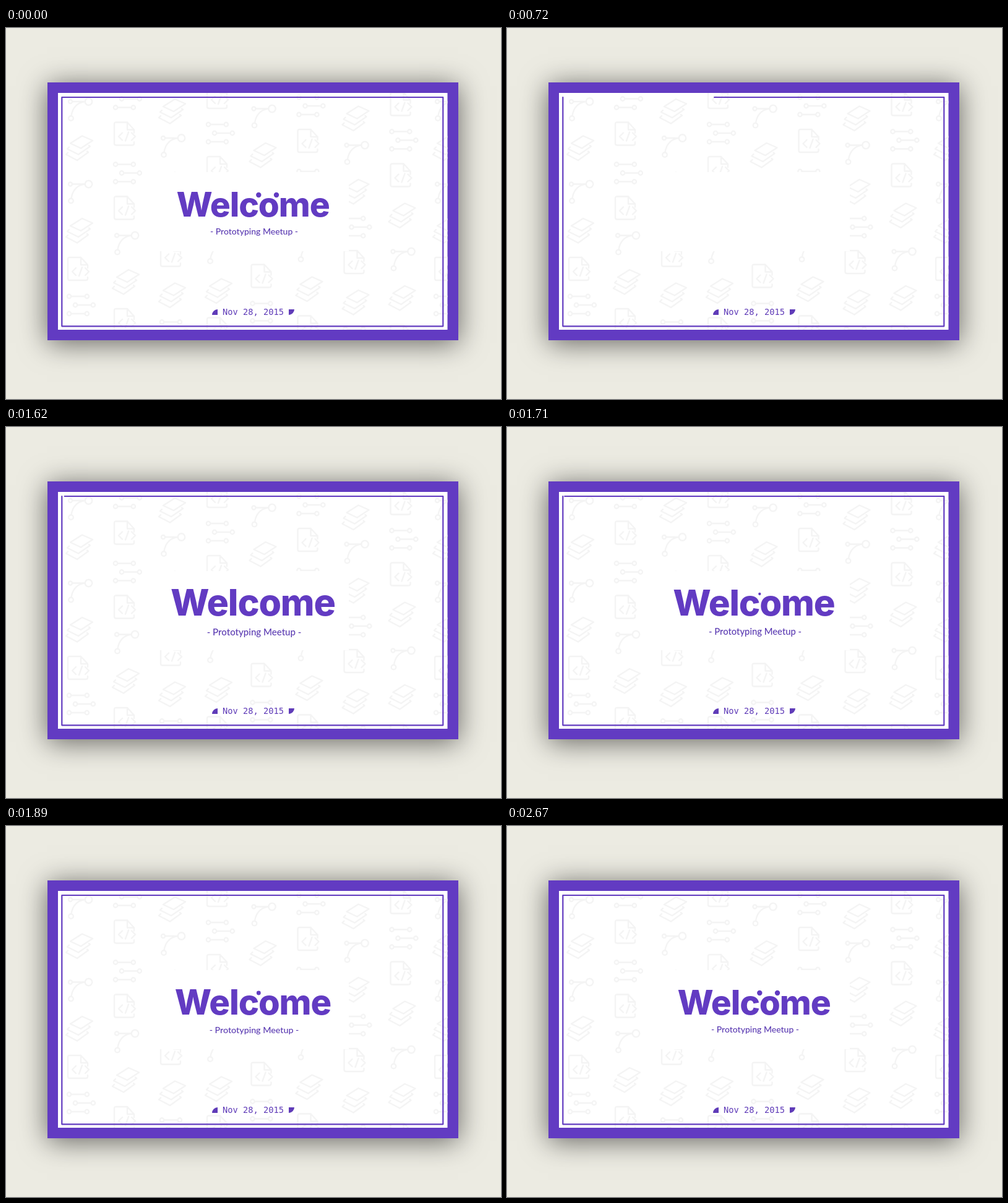
Recreate the animation shown at these times as an HTML page. Size 800 by 600 pixels, loop 3.33 s.

```html
<!DOCTYPE html>
<html lang="en">
<head>
<meta charset="utf-8">
<title>Welcome</title>
<style>
html, body { margin: 0; width: 100%; height: 100%; overflow: hidden; background: #ecebe2; }
.card { position: absolute; left: 67px; top: 87.7px; width: 663.5px; height: 417.5px; background: #623bc2;
  box-shadow: 0 5px 42px rgba(0, 0, 0, .58); }
svg { position: absolute; left: 0; top: 0; }
.icons { fill: none; stroke: #f4f4f4; stroke-width: 2.4; stroke-linecap: round; stroke-linejoin: round; }
.title { font: 800 55px Inter, sans-serif; letter-spacing: -1.1px; }
.sub { font: 500 14px Lato, sans-serif; }
.date { font: 13.7px "DejaVu Sans Mono", monospace; }
</style>
</head>
<body>
<div class="card"></div>
<svg width="800" height="600" viewBox="0 0 800 600">
  <defs>
    <clipPath id="paper"><rect x="84" y="105" width="629.5" height="383"/></clipPath>
    <g id="curve">
      <circle r="5.7"/><circle cx="-29.5" r="3"/><circle cx="-28.5" cy="27" r="3.8"/>
      <path d="M-26.5 0H-5.7M-28 23C-26 9-17 1-6 0"/>
    </g>
    <g id="row"><path d="M3.3 0H25.5"/><circle r="3.2"/><circle cx="28.8" r="3.2"/></g>
    <g id="lines"><use href="#row"/><use href="#row" x="10" y="14"/><use href="#row" y="28"/></g>
    <path id="file" d="M32 17V12L21 0H3Q0 0 0 3V34Q0 37 3 37H29Q32 37 32 34V32M21 0V12H32M13 17l-6 6 6 6M23 16l-5 14M28 17l6 6-6 6"/>
    <path id="stack" d="M8 13L27 1 44 8.500 25 21ZM6 19L3 22 21 31 40 18 38 16.500M4 28L1 31 19 40.500 37 27.500 35 26"/>
  </defs>
  <g clip-path="url(#paper)">
    <path fill="#fff" d="M84 105H714V488H84Z"/>
    <g class="icons" id="icons"></g>
    <path fill="#fff" d="M232 233H554V361H232ZM331 452H469V466H331Z"/>
  </g>
  <g fill="#5f3bb8">
    <path d="M333 464a9 9 0 0 1 9-9v9zM457 455h9a9 9 0 0 1-9 9z"/>
    <text class="date" x="399.500" y="464" text-anchor="middle">Nov 28, 2015</text>
  </g>
  <path id="frame" d="M90.300 112V482.300H706.300V112H90.300" fill="none" stroke="#623bc0" stroke-width="2.2" stroke-linecap="round" stroke-linejoin="round"/>
  <g id="words" fill="#623bc2" text-anchor="middle">
    <text class="title" x="399" y="304.500">Welcome</text>
    <text class="sub" x="401" y="334" fill="#5b3bb2">- Prototyping Meetup -</text>
  </g>
  <g fill="#623bc2" stroke="#fff" stroke-width="2.4">
    <circle class="dot" cx="408.300" cy="270"/>
    <circle class="dot" cx="437" cy="270"/>
  </g>
</svg>
<script>
const LOOP = 3330, STEP = 30, RESET = 180;
const get = id => document.getElementById(id);

// Each column stacks icons downwards; a space adds a little extra gap
const icons = {
  c: { id: "curve", x: 133.5, height: 54.5 },
  s: { id: "stack", x: 96, height: 64 },
  f: { id: "file", x: 100, height: 63 },
  l: { id: "lines", x: 102, height: 52 }
};
const columns = [
  { y: 119, order: "cs   csfl" },
  { y: 100.5, order: "lf lfcsf" },
  { y: 114, order: "scslfsl" },
  { y: 93, order: "flfs   csf" }
];

function column(i) {
  const group = Math.floor(i / 4);
  const { y: top, order } = columns[i % 4];
  const left = i * 75 - group * 3.5;
  let y = top + (group % 2) * 11.5, out = "";
  for (const key of order) {
    const icon = icons[key];
    if (icon) out += `<use href="#${icon.id}" x="${icon.x + left}" y="${y}"/>`;
    y += icon ? icon.height : 5;
  }
  return out;
}
get("icons").innerHTML = Array.from({ length: 9 }, (_, i) => column(i)).join("");

const frame = get("frame"), words = get("words");
const dots = [...document.querySelectorAll(".dot")];
const length = frame.getTotalLength();
const clamp = v => Math.max(0, Math.min(1, v));

// Overdamped spring from 0 to 1
function glide(t) {
  const a = .00447, b = .016;
  return 1 - (b * Math.exp(-a * t) - a * Math.exp(-b * t)) / (b - a);
}

const pop = t => t <= 0 ? 0 : Math.max(0, 1 - Math.exp(-.008 * t) * Math.cos(.03 * t));

function draw(time) {
  const t = time < RESET ? LOOP : time;

  const drawn = t > 2250 ? length : length * glide(t - RESET);
  frame.setAttribute("stroke-dasharray", drawn >= length ? "none" : `${drawn} ${length + 10}`);

  const scale = 1 + .05 * (1 + Math.cos(Math.PI * clamp((t - 1376) / 732)));
  words.setAttribute("transform", `translate(400 297) scale(${scale}) translate(-400 -297)`);
  words.setAttribute("opacity", clamp((t - 1380) / 180));

  dots.forEach((dot, i) => {
    const size = pop(t - 1680 - i * 330);
    dot.setAttribute("r", 4.2 * size + 1.2);
    dot.setAttribute("visibility", size ? "visible" : "hidden");
  });
}

const start = performance.now();
function tick() {
  const time = (performance.now() - start) % LOOP;
  draw(Math.floor(time / STEP) * STEP);
  requestAnimationFrame(tick);
}
tick();
</script>
</body>
</html>
```
